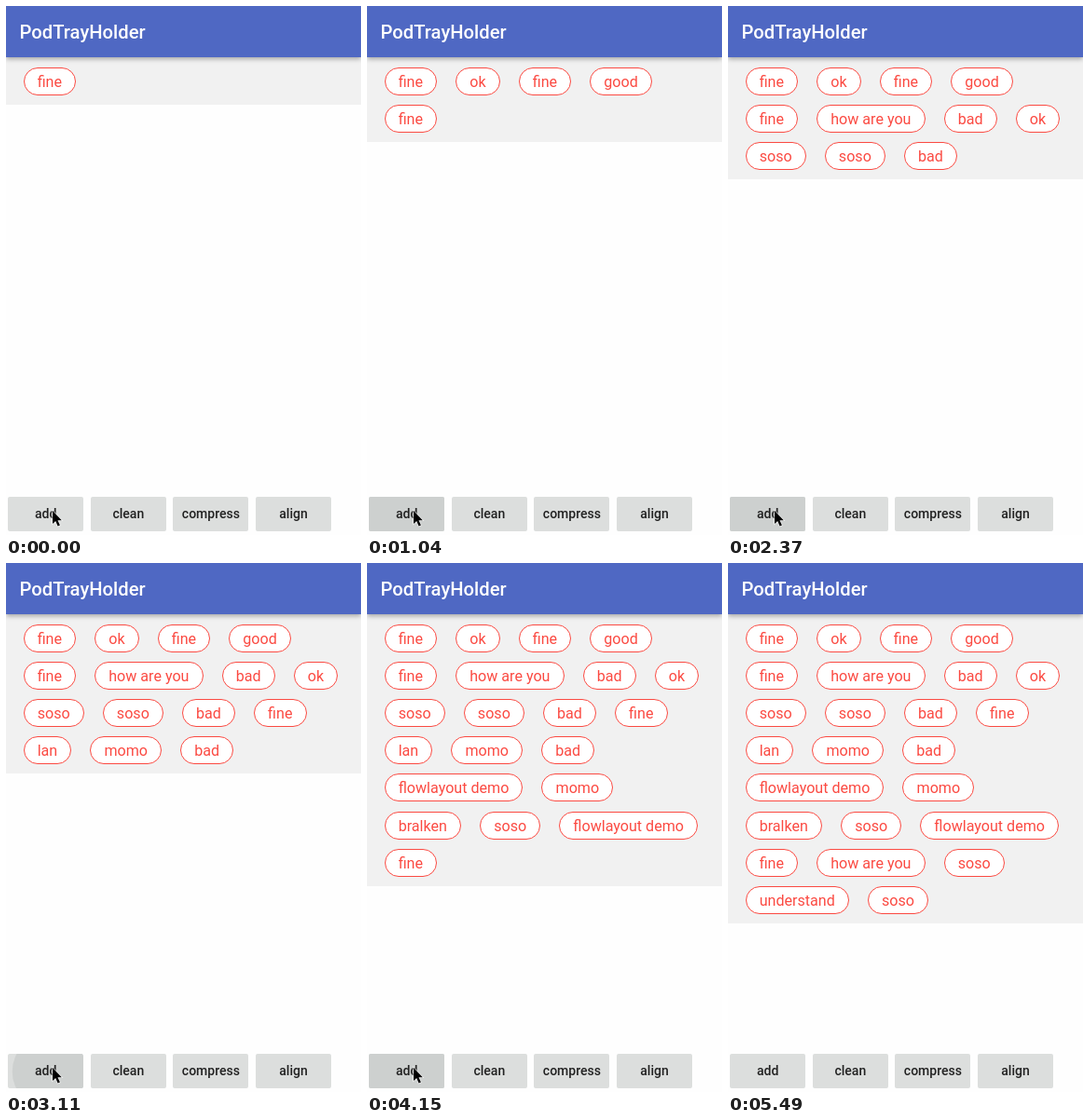
Recreate the animation shown at these times as an HTML page. Size 381 by 568 pixels, loop 7140 ms.

```html
<!DOCTYPE html>
<html lang="en">
<head>
<meta charset="utf-8">
<title>Tag flow</title>
<style>
  html, body { margin: 0; width: 100%; height: 100%; overflow: hidden; }
  body { position: relative; background: #fefefe; font-family: Roboto, sans-serif; }

  header {
    position: absolute; z-index: 1; left: 0; top: 0; width: 381px; height: 55px;
    box-sizing: border-box; padding-left: 14.5px;
    background: #4f68c3; color: #fff;
    font-size: 20.2px; font-weight: 500; line-height: 56px;
    box-shadow: 0 2px 5px rgba(0, 0, 0, .32);
  }

  #tags {
    position: absolute; left: 0; top: 55px; width: 381px; box-sizing: border-box;
    padding: 10.6px 18.6px 10px;
    display: flex; flex-wrap: wrap; gap: 10.2px 20px;
    background: #f1f1f1;
  }
  #tags span {
    box-sizing: border-box; height: 30px; padding: 0 14.1px;
    border: 1px solid #fb4a42; border-radius: 15px;
    background: #fff; color: #fb4a42;
    font-size: 16.1px; line-height: 29px; white-space: nowrap;
  }
  #tags [hidden] { display: none; }

  .btn {
    position: absolute; top: 527px; width: 81px; height: 36.5px;
    border-radius: 2px; overflow: hidden;
    background: #dcdedd; color: #222;
    font-size: 14px; font-weight: 500; line-height: 37px; text-align: center;
  }
  .btn b { position: relative; font-weight: 500; }
  #ripple { position: absolute; inset: 0; background: #cdd0cf; }
  #cursor { position: absolute; left: 0; top: 0; }
</style>
</head>
<body>
<header>PodTrayHolder</header>
<div id="tags"></div>
<div class="btn" style="left:2.2px"><i id="ripple"></i><b>add</b></div>
<div class="btn" style="left:90.8px"><b>clean</b></div>
<div class="btn" style="left:179.4px"><b>compress</b></div>
<div class="btn" style="left:268px"><b>align</b></div>
<svg id="cursor" width="381" height="568">
  <path d="M0 0V14L3.2 11.1 5.6 16.6 7.9 15.6 5.5 10.3H9.8Z"
        stroke="#fff" stroke-opacity=".75" stroke-width="1.4" paint-order="stroke"/>
</svg>

<script>
  const LOOP = 7140, TICK = 148;

  // label and the tick at which it is added
  const tags = [
    ['fine', 0], ['ok', 1], ['fine', 4], ['good', 6],
    ['fine', 7], ['how are you', 9], ['bad', 10], ['ok', 12],
    ['soso', 13], ['soso', 14], ['bad', 16], ['fine', 17],
    ['lan', 19], ['momo', 20], ['bad', 21],
    ['flowlayout demo', 22], ['momo', 23],
    ['bralken', 25], ['soso', 26], ['flowlayout demo', 27],
    ['fine', 28], ['how are you', 30], ['soso', 31],
    ['understand', 32], ['soso', 34]
  ];

  // press ripple radius from each tick on
  const ripples = [[0, 0], [4, 25], [6, 90], [21, 40], [22, 90], [32, 25], [33, 90], [36, 0]];
  const LEAVE = 36, GONE = 37;

  const box = document.getElementById('tags');
  const ripple = document.getElementById('ripple');
  const arrow = document.querySelector('#cursor path');

  const chips = tags.map(([label, at]) => {
    const el = document.createElement('span');
    el.textContent = label;
    el.hidden = at > 0;
    box.append(el);
    return { el, at };
  });

  function draw(tick) {
    for (const { el, at } of chips) el.hidden = tick < at;
    const radius = ripples.filter(([at]) => at <= tick).pop()[1];
    ripple.style.clipPath = `circle(${radius}px at 44.5px 19px)`;
    arrow.setAttribute('transform', tick < LEAVE ? 'translate(50 542)' : 'translate(155.5 555)');
    arrow.style.display = tick < GONE ? '' : 'none';
  }

  const start = performance.now();
  let last = -1;
  function frame() {
    const t = (performance.now() - start) % LOOP;
    const tick = Math.floor((t + 3) / TICK);
    if (tick !== last) draw(last = tick);
    requestAnimationFrame(frame);
  }
  frame();
</script>
</body>
</html>
```
